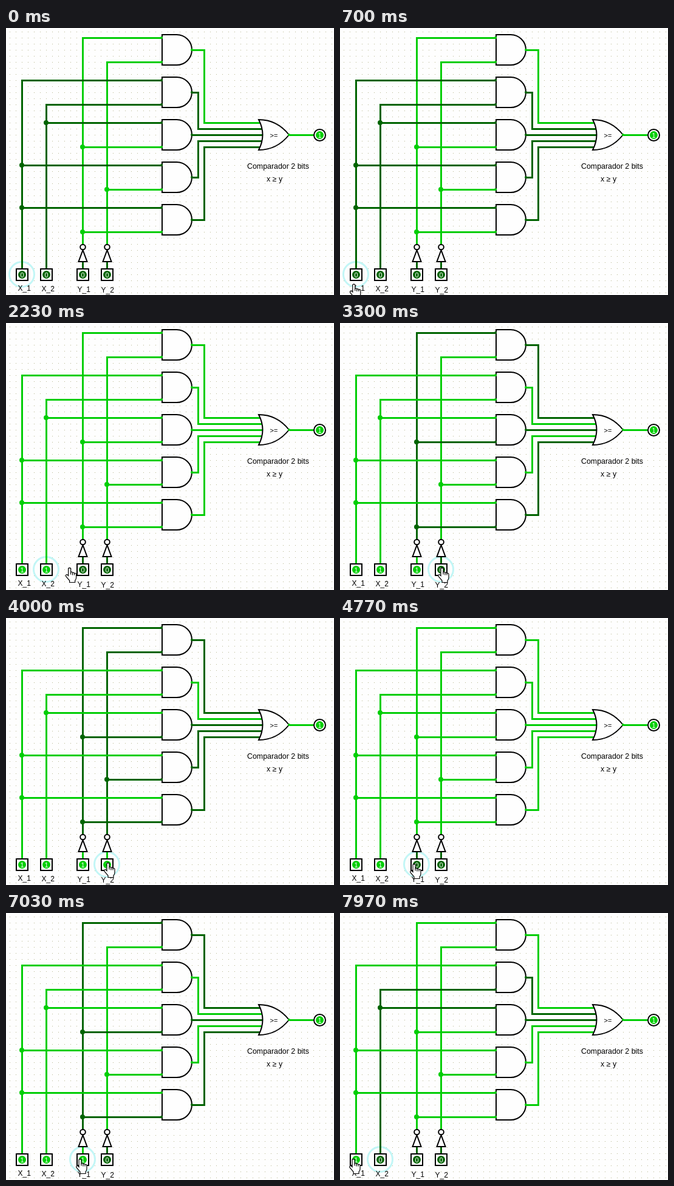
An HTML page with a canvas that plays this animation: 540 px wide and 440 px high, repeating every 8 s.

```html
<!DOCTYPE html>
<html lang="es">
<head>
<meta charset="utf-8">
<title>Comparador 2 bits</title>
<style>
  html, body { margin: 0; width: 100%; height: 100%; overflow: hidden; background: #fefefe; }
  canvas { display: block; }
</style>
</head>
<body>
<canvas id="stage" width="540" height="440"></canvas>
<script>
const ctx = document.getElementById('stage').getContext('2d');
const LOOP = 8000, PRESS = 80, REST = 130, LEAD = 170;
const PAPER = '#fefefe', ON = '#02ce06', OFF = '#006400', INK = '#000';
const FONT = '"Liberation Sans", Arial, sans-serif';
const GATE_LEFT = 256, GATE_RIGHT = 306, OR_TIP = 466, MIDDLE = 176;

const X1 = { label: 'X_1', x: 26 };
const X2 = { label: 'X_2', x: 66 };
const Y1 = { label: 'Y_1', x: 126, inverted: true };
const Y2 = { label: 'Y_2', x: 166, inverted: true };
const pins = [X1, X2, Y1, Y2];

// Inputs of each AND gate, top to bottom
const gates = [[Y1, Y2], [X1, X2], [X2, Y1], [X1, Y2], [X1, Y1]];

// Every click flips its pin; the last one falls after the loop and only draws the pointer there.
const clicks = [
  [1400, X1], [1900, X2], [2550, Y1], [3350, Y2], [4280, Y2], [4700, Y1],
  [5200, Y1], [5960, Y2], [6580, Y2], [7050, Y1], [7500, X2], [8150, X1]
].map(([time, pin]) => ({ time, pin }));

// The pointer stops a little short of each pin, on the side it comes from.
const stops = [{ time: 0, x: 10, y: 442 }];
for (const { time, pin } of clicks) {
  const last = stops[stops.length - 1];
  const samePin = last.pin === pin;
  const side = Math.sign(pin.x - 8 - last.x);
  stops.push({
    time, pin,
    x: samePin ? last.x : pin.x - 8 + 3 * side,
    y: samePin ? last.y : 403.5 - side
  });
}
const hand = new Path2D('M5 2q2-2 4 0v6q2-1 3 1q2-1 3 1q3-1 3 2v5q0 3-2 5v3h-9v-3l-6-7q-1-3 2-3l2 2z');
const knuckles = new Path2D('M9 8v4M12 9v4M15 10v3');

const signalColor = on => on ? ON : OFF;
const smooth = k => k * k * (3 - 2 * k);

function wire(on, ...points) {
  ctx.strokeStyle = signalColor(on);
  ctx.lineWidth = 3;
  ctx.beginPath();
  for (let i = 0; i < points.length; i += 2) ctx.lineTo(points[i] + .5, points[i + 1] + .5);
  ctx.stroke();
}

function disc(x, y, r, fill, stroke, width = 2) {
  ctx.beginPath();
  ctx.arc(x, y, r, 0, Math.PI * 2);
  if (fill) { ctx.fillStyle = fill; ctx.fill(); }
  if (stroke) { ctx.strokeStyle = stroke; ctx.lineWidth = width; ctx.stroke(); }
}

const junction = (on, x, y) => disc(x, y, 4, signalColor(on));
const port = (on, x, y) => disc(x, y, 2, signalColor(on));

function text(str, x, y, size = 12, color = INK, align = 'left') {
  ctx.font = `${size}px ${FONT}`;
  ctx.fillStyle = color;
  ctx.textAlign = align;
  ctx.fillText(str, x, y);
}

function outline() {
  ctx.fillStyle = PAPER;
  ctx.strokeStyle = INK;
  ctx.lineWidth = 2;
  ctx.fill();
  ctx.stroke();
}

function bit(on, x, y) {
  disc(x + .5, y + .5, 6.5, signalColor(on));
  text(on ? '1' : '0', x + .5, y + 4.5, 11, '#fff', 'center');
}

function andGate(y) {
  const left = GATE_LEFT + 1, middle = GATE_LEFT + 25;
  ctx.beginPath();
  ctx.moveTo(middle, y - 25);
  ctx.lineTo(left, y - 25);
  ctx.lineTo(left, y + 25);
  ctx.lineTo(middle, y + 25);
  ctx.arc(middle, y, 25, Math.PI / 2, -Math.PI / 2, true);
  outline();
}

function orGate(x, y) {
  ctx.beginPath();
  ctx.moveTo(x, y);
  ctx.quadraticCurveTo(x - 20, y - 25, x - 50, y - 25);
  ctx.quadraticCurveTo(x - 37, y, x - 50, y + 25);
  ctx.quadraticCurveTo(x - 20, y + 25, x, y);
  outline();
}

function notGate(x) {
  ctx.beginPath();
  ctx.moveTo(x + .5, 366);
  ctx.lineTo(x - 6.5, 385);
  ctx.lineTo(x + 7.5, 385);
  ctx.closePath();
  outline();
  disc(x + .5, 361, 4.3, PAPER, INK);
}

function drawGrid() {
  ctx.fillStyle = PAPER;
  ctx.fillRect(0, 0, 540, 440);
  ctx.fillStyle = '#b4b48c';
  for (let x = 6; x < 540; x += 10)
    for (let y = 6; y < 440; y += 10) ctx.fillRect(x, y, 1, 1);
}

function drawCircuit(isOn) {
  const signal = pin => isOn(pin) !== Boolean(pin.inverted);
  const outputs = gates.map(inputs => inputs.every(signal));
  const result = outputs.some(Boolean);
  const tapped = new Set();

  gates.forEach((inputs, i) => {
    const y = 36 + 70 * i, on = outputs[i];
    const bend = i % 4 ? 316 : 326, entry = MIDDLE + 10 * (i - 2);
    andGate(y);
    inputs.forEach((pin, side) => {
      const row = y - 20 + 40 * side, value = signal(pin);
      // The topmost tap is the trunk's corner; lower taps get a junction.
      if (tapped.has(pin)) {
        wire(value, pin.x, row, GATE_LEFT, row);
        junction(value, pin.x, row);
      } else {
        wire(value, pin.x, pin.inverted ? 357 : 396, pin.x, row, GATE_LEFT, row);
      }
      tapped.add(pin);
      port(value, GATE_LEFT, row);
    });
    wire(on, GATE_RIGHT, y, bend, y, bend, entry, 424, entry);
    port(on, GATE_RIGHT, y);
  });

  wire(result, OR_TIP, MIDDLE, 507, MIDDLE);
  orGate(OR_TIP, MIDDLE);
  port(result, OR_TIP, MIDDLE);
  text('>=', 441, 181, 11, INK, 'center');
  disc(516.5, 176.5, 9.5, PAPER, INK);
  bit(result, 516, MIDDLE);
  text('Comparador 2 bits', 397, 232, 12.4);
  text('x ≥ y', 429, 253, 12.4);
}

function drawPin(pin, i, on) {
  if (pin.inverted) {
    wire(on, pin.x, 385, pin.x, 396);
    notGate(pin.x);
  }
  ctx.beginPath();
  ctx.rect(pin.x - 9, 397, 19, 19);
  outline();
  bit(on, pin.x, 406);
  text(pin.label, pin.x - 6.5 - i, 433 + i);
}

function drawPointer(t) {
  const i = stops.findIndex(stop => stop.time > t);
  const from = stops[i - 1], to = stops[i];
  const leave = from.time + REST, arrive = to.time - LEAD;
  const k = smooth(Math.min(1, Math.max(0, (t - leave) / (arrive - leave))));
  ctx.save();
  ctx.translate(from.x + (to.x - from.x) * k, from.y + (to.y - from.y) * k);
  ctx.fillStyle = '#fff';
  ctx.strokeStyle = INK;
  ctx.lineWidth = 1.2;
  ctx.fill(hand);
  ctx.stroke(hand);
  ctx.stroke(knuckles);
  ctx.restore();
}

function draw(t) {
  const isOn = pin => clicks.filter(c => c.pin === pin && c.time <= t).length % 2 === 1;
  const pressed = clicks.filter(c => c.time - PRESS <= t).pop();
  const active = pressed ? pressed.pin : X1;

  drawGrid();
  disc(active.x, 406, 20.5, null, '#c2f6f6', 3);
  drawCircuit(isOn);
  pins.forEach((pin, i) => drawPin(pin, i, isOn(pin)));
  drawPointer(t);
}

const start = performance.now();
function tick() {
  draw((performance.now() - start) % LOOP);
  requestAnimationFrame(tick);
}
tick();
</script>
</body>
</html>
```
